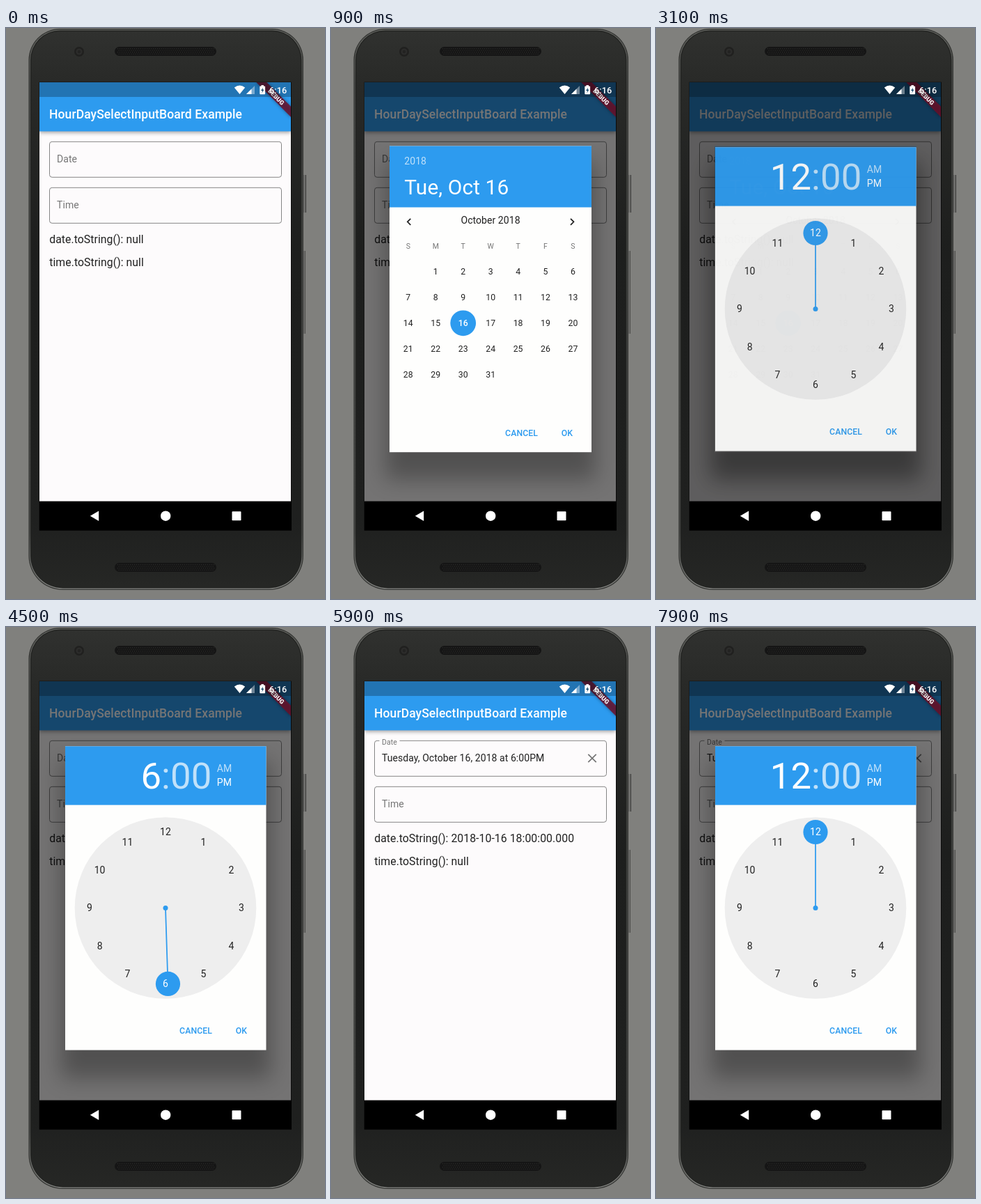
These frames come from a looping animation (458 by 820 pixels, 8000 ms). An HTML page with a canvas:

```html
<!DOCTYPE html>
<html lang="en">
<head>
<meta charset="utf-8">
<title>Date and time form</title>
<style>
html, body { margin: 0; width: 100%; height: 100%; overflow: hidden; background: #80807d; }
canvas { display: block; }
</style>
</head>
<body>
<canvas id="stage" width="458" height="820"></canvas>
<script>
const W = 458, H = 820, LOOP = 8000, STEP = 100;
const DP = 0.8774;
const BLUE = '#2d9bef', INK = '#212121', GREY = '#767676', PAPER = '#fefefd';
const SCREEN = { x: 48, y: 78, w: 361, h: 643 };
const NAV_Y = 679.6;

const ctx = document.getElementById('stage').getContext('2d');

function makeLayer() {
  const c = document.createElement('canvas');
  c.width = W;
  c.height = H;
  return c;
}

const clamp = v => Math.max(0, Math.min(1, v));
const mix = (a, b, k) => a + (b - a) * k;
const rise = (t, start) => 1 - (1 - clamp((t - start) / 250)) ** 2;
const fall = (t, start) => 1 - clamp((t - start) / 250) ** 2;

// y is the middle of the line box; size is in dp
function text(g, str, x, y, size, color, align = 'left', weight = 400) {
  const px = size * DP;
  g.font = `${weight} ${px}px Roboto, sans-serif`;
  g.letterSpacing = `${px * 0.004}px`;
  g.textAlign = align;
  g.textBaseline = 'alphabetic';
  g.fillStyle = color;
  g.fillText(str, x, y + px * 0.342);
}

function rect(g, x, y, w, h, color) {
  g.fillStyle = color;
  g.fillRect(x, y, w, h);
}

function roundRect(g, x, y, w, h, r, color) {
  g.beginPath();
  g.roundRect(x, y, w, h, r);
  g.fillStyle = color;
  g.fill();
}

function disc(g, x, y, r, color) {
  g.beginPath();
  g.arc(x, y, r, 0, Math.PI * 2);
  g.fillStyle = color;
  g.fill();
}

function poly(g, pts, color) {
  g.beginPath();
  pts.forEach(([x, y]) => g.lineTo(x, y));
  g.closePath();
  g.fillStyle = color;
  g.fill();
}

function stroke(g, pts, color, width) {
  g.beginPath();
  pts.forEach(([x, y], i) => i ? g.lineTo(x, y) : g.moveTo(x, y));
  g.strokeStyle = color;
  g.lineWidth = width;
  g.stroke();
}

function gradient(g, x0, y0, x1, y1, stops) {
  const grad = g.createLinearGradient(x0, y0, x1, y1);
  stops.forEach(([k, c]) => grad.addColorStop(k, c));
  return grad;
}

// ---- phone body ----

function grille(g, y) {
  roundRect(g, 156, y, 146, 13, 6.5, '#151515');
  for (let row = 0; row < 4; row++)
    for (let x = 160 + (row % 2) * 1.5; x < 299; x += 3)
      rect(g, x, y + 2 + row * 2.6, 1.2, 1.2, '#2b2b2a');
}

// concentric shells, each inset from the outer edge
function shell(g, inset, fill) {
  const top = 45 - inset, low = 49 - inset;
  roundRect(g, 32.5 + inset, 1 + inset, 394.5 - 2 * inset, 806 - 2 * inset, [top, top, low, low], fill);
}

function drawPhone(g) {
  rect(g, 0, 0, W, H, '#80807d');
  rect(g, 427, 211, 4, 54, '#6c6c6a');
  rect(g, 430, 211, 1, 54, '#3e3e3c');
  rect(g, 427, 320, 2.6, 119, '#6c6c6a');
  rect(g, 429, 320, 0.8, 119, '#484846');
  shell(g, 0, '#353634');
  shell(g, 1.3, gradient(g, 0, 0, 0, 807,
    [[0, '#62635f'], [0.1, '#4b4c4a'], [0.9, '#484947'], [1, '#858683']]));
  shell(g, 2.6, '#222321');
  shell(g, 4, gradient(g, 0, 4, 0, 804,
    [[0, '#30312f'], [0.09, '#292a28'], [0.4, '#1d1e1d'], [0.88, '#1f201f'], [1, '#262725']]));
  grille(g, 27);
  grille(g, 768);
  disc(g, 105, 34, 7, '#20201f');
  disc(g, 105, 34, 4.5, '#2c2c2b');
  disc(g, 105, 34, 2.2, '#232322');
  rect(g, 47.6, 77.6, 362.4, 644, '#0b0b0b');
}

// ---- app page ----

function drawField(g, y, label, value, float) {
  const size = mix(16, 12, float), labelY = mix(y + 25.5, y + 2, float);
  g.beginPath();
  g.roundRect(62.5, y + 0.3, 333, 51, 3.6);
  g.strokeStyle = '#858585';
  g.lineWidth = 1;
  g.stroke();
  if (float > 0.6) rect(g, 69.5, y - 1, 29, 3, '#fdfbfc');
  text(g, label, 73, labelY, size, GREY);
  if (!value) return;
  text(g, value, 73, y + 24.8, 16, INK);
  const cx = 375, cy = y + 25.5, d = 5.7;
  stroke(g, [[cx - d, cy - d], [cx + d, cy + d]], GREY, 1.7);
  stroke(g, [[cx - d, cy + d], [cx + d, cy - d]], GREY, 1.7);
}

function drawPage(g, t) {
  const picked = t >= 5700;
  rect(g, SCREEN.x, SCREEN.y, SCREEN.w, SCREEN.h, '#fdfbfc');
  g.save();
  g.beginPath();
  g.rect(SCREEN.x, SCREEN.y, SCREEN.w, SCREEN.h);
  g.clip();
  g.shadowColor = 'rgba(0,0,0,.4)';
  g.shadowBlur = 6;
  g.shadowOffsetY = 2;
  rect(g, SCREEN.x, SCREEN.y, SCREEN.w, 70.4, BLUE);
  g.restore();
  text(g, 'HourDaySelectInputBoard Example', 62, 124, 20, '#fff', 'left', 500);

  drawField(g, 163, 'Date', picked ? 'Tuesday, October 16, 2018 at 6:00PM' : '',
    picked ? clamp((t - 5600) / 300) : 0);
  drawField(g, 229, 'Time', '', 0);
  text(g, 'date.toString(): ' + (picked ? '2018-10-16 18:00:00.000' : 'null'), 62.2, 304, 18, INK);
  text(g, 'time.toString(): null', 62.2, 336.8, 18, INK);
}

// ---- dialogs ----

function drawSheet(g, x, y, w, h, headH) {
  g.save();
  g.beginPath();
  g.rect(SCREEN.x, SCREEN.y, SCREEN.w, NAV_Y - SCREEN.y);
  g.clip();
  // only the shadow of this far-off rectangle lands on the screen
  g.shadowColor = 'rgba(0,0,0,.3)';
  g.shadowBlur = 29;
  g.shadowOffsetX = 1000;
  rect(g, x - 6 - 1000, y + 22, w + 12, h + 18, '#000');
  g.restore();
  rect(g, x, y, w, h, PAPER);
  rect(g, x, y, w, headH, BLUE);
}

function drawButtons(g, x, y, press) {
  if (press) roundRect(g, x - 28, y - 15.5, 56, 31, 1.7, `rgba(0,0,0,${0.04 * press})`);
  text(g, 'CANCEL', x - 65.5, y, 14, BLUE, 'center', 500);
  text(g, 'OK', x, y, 14, BLUE, 'center', 500);
}

function drawCalendar(g, t) {
  const colX = c => 110.8 + c * 39.45, rowY = r => 350 + r * 36.9;
  drawSheet(g, 84, 169.5, 290, 439.7, 88);
  text(g, '2018', 105.3, 191, 16, 'rgba(255,255,255,.7)');
  text(g, 'Tue, Oct 16', 105.3, 229, 34, '#fff');
  text(g, 'October 2018', 229, 276.3, 16, INK, 'center');
  stroke(g, [[114.3, 273.8], [109.8, 278.3], [114.3, 282.8]], INK, 1.7);
  stroke(g, [[344, 273.8], [348.5, 278.3], [344, 282.8]], INK, 1.7);
  [...'SMTWTFS'].forEach((d, i) => text(g, d, colX(i), 313, 12, GREY, 'center'));
  for (let day = 1; day <= 31; day++) {
    const x = colX(day % 7), y = rowY(Math.floor(day / 7));
    const on = day === 16;
    if (on) disc(g, x, y, 18.4, BLUE);
    text(g, String(day), x, y, 14, on ? '#fff' : INK, 'center', on ? 500 : 400);
  }
  drawButtons(g, 339, 581.3, t >= 2800 ? 1 : 0);
}

function drawClock(g, t) {
  const cx = 229, cy = 403.5, reach = 109;
  const hour = t >= 4500 && t < 7000 ? 6 : 12;
  const at = a => [cx + reach * Math.sin(a), cy - reach * Math.cos(a)];
  const drift = hour === 6 ? 0.032 * (1 - clamp((t - 4500) / 300)) : 0;
  const [hx, hy] = at(hour * Math.PI / 6 - drift);

  drawSheet(g, 85, 171.3, 288.5, 436.3, 84.3);
  text(g, String(hour), 223.2, 214, 60, '#fff', 'right');
  text(g, ':', 229.5, 214, 60, 'rgba(255,255,255,.7)', 'center');
  text(g, '00', 236, 214, 60, 'rgba(255,255,255,.7)');
  text(g, 'AM', 302.8, 203.3, 16, 'rgba(255,255,255,.7)');
  text(g, 'PM', 302.8, 223.5, 16, '#fff');

  disc(g, cx, cy, 130.3, '#eeeeee');
  stroke(g, [[cx, cy], [hx, hy]], BLUE, 1.75);
  disc(g, cx, cy, 3.5, BLUE);
  disc(g, hx, hy, 17.6, BLUE);
  for (let n = 1; n <= 12; n++) {
    const [x, y] = at(n * Math.PI / 6);
    text(g, String(n), x, y, 16, n === hour ? '#fff' : INK, 'center');
  }
  drawButtons(g, 338, 579.7, t >= 5500 && t < 7000 ? 0.5 : 0);
}

// ---- overlays ----

function drawBanner(g) {
  g.save();
  g.beginPath();
  g.rect(SCREEN.x, SCREEN.y, SCREEN.w, SCREEN.h);
  g.clip();
  g.translate(SCREEN.x + SCREEN.w, SCREEN.y);
  g.rotate(Math.PI / 4);
  g.save();
  g.shadowColor = 'rgba(0,0,0,.6)';
  g.shadowBlur = 5;
  rect(g, -40 * DP, 28 * DP, 80 * DP, 12 * DP, 'rgba(160,24,40,.66)');
  g.restore();
  rect(g, -40 * DP, 28 * DP, 80 * DP, 12 * DP, 'rgba(70,8,40,.45)');
  text(g, 'DEBUG', 0, 34 * DP, 10.2, '#fff', 'center', 900);
  g.restore();
}

function drawSystemBars(g) {
  rect(g, SCREEN.x, SCREEN.y, SCREEN.w, 21, 'rgba(0,0,0,.25)');

  g.beginPath();
  g.moveTo(335.5, 95);
  g.lineTo(327.8, 85.4);
  g.quadraticCurveTo(335.5, 79.6, 343.2, 85.4);
  g.closePath();
  g.fillStyle = '#fff';
  g.fill();
  poly(g, [[345, 95], [357, 95], [357, 83]], 'rgba(255,255,255,.4)');
  poly(g, [[345, 95], [352.5, 95], [352.5, 87.5]], '#fff');
  roundRect(g, 364.3, 83.4, 7.8, 11.8, 1, '#fff');
  rect(g, 366.5, 82, 3.4, 2, '#fff');
  poly(g, [[369, 85.4], [366, 90], [368, 90], [367.4, 93.4], [370.4, 88.6], [368.5, 88.6]], '#174a6e');
  text(g, '6:16', 403.3, 89.3, 14.5, '#fff', 'right', 500);

  rect(g, SCREEN.x, NAV_Y, 362, 721.5 - NAV_Y, '#000');
  poly(g, [[120.8, 700.7], [133.2, 693.4], [133.2, 708]], '#fff');
  disc(g, 229.2, 700.7, 7.2, '#fff');
  roundRect(g, 324.5, 694.3, 13, 13, 0.8, '#fff');
}

// ---- timeline ----

const phone = makeLayer();
drawPhone(phone.getContext('2d'));
const sheet = makeLayer();
const sheetCtx = sheet.getContext('2d');

function drawDialog(draw, t, shown) {
  if (shown <= 0) return;
  rect(ctx, SCREEN.x, SCREEN.y, SCREEN.w, SCREEN.h, `rgba(0,0,0,${0.54 * shown})`);
  sheetCtx.clearRect(0, 0, W, H);
  draw(sheetCtx, t);
  ctx.globalAlpha = shown;
  ctx.drawImage(sheet, 0, 0);
  ctx.globalAlpha = 1;
}

function calendarShown(t) {
  return t < 3000 ? rise(t, 580) : fall(t, 2917);
}

function clockShown(t) {
  if (t < 5700) return rise(t, 2917);
  return t < 7000 ? fall(t, 5617) : rise(t, 7617);
}

function frame() {
  // the screen refreshes ten times a second
  const t = Math.floor(performance.now() % LOOP / STEP) * STEP;
  ctx.drawImage(phone, 0, 0);
  drawPage(ctx, t);
  drawDialog(drawCalendar, t, calendarShown(t));
  drawDialog(drawClock, t, clockShown(t));
  drawBanner(ctx);
  drawSystemBars(ctx);
  requestAnimationFrame(frame);
}

frame();
</script>
</body>
</html>
```
